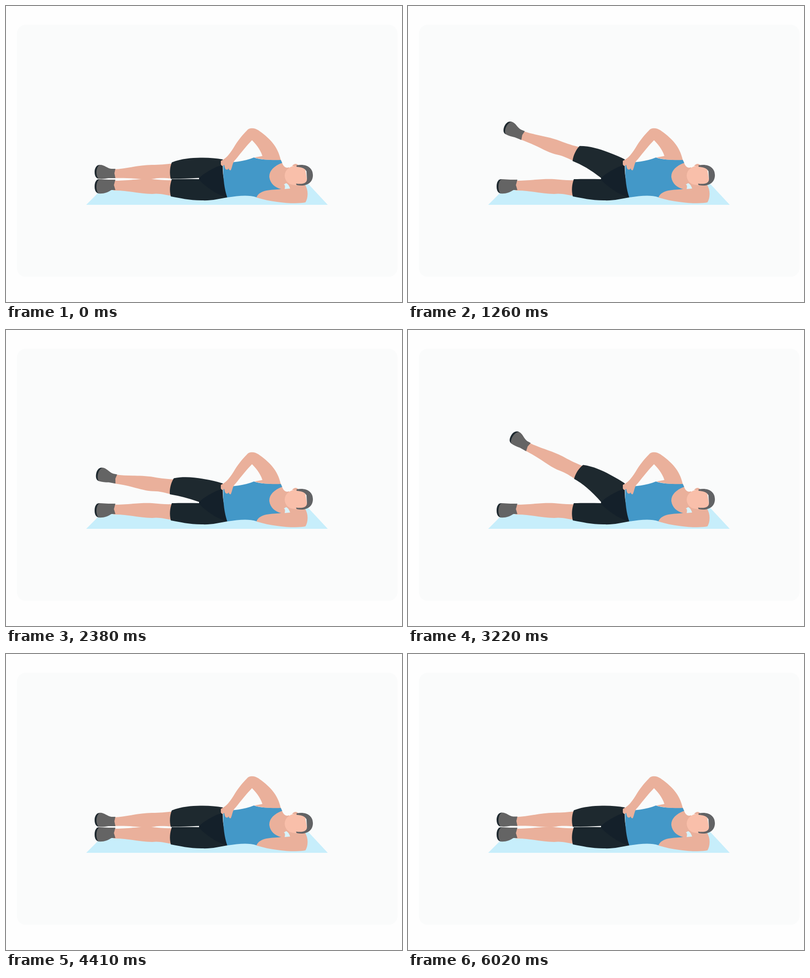
Animation of 800x600 px, one loop 6.09 s. Source, as an HTML page:

```html
<!DOCTYPE html>
<html lang="en">
<head>
<meta charset="utf-8">
<title>Side leg raise</title>
<style>
  html, body { margin: 0; width: 100%; height: 100%; overflow: hidden; background: #fefefe; }
  svg { display: block; width: 100vw; height: 100vh; }
  .skin { fill: #eab09b; }
  .shoe { fill: #646464; }
  .dark { fill: #1e292f; }
</style>
</head>
<body>
<svg viewBox="0 0 800 600">
  <rect width="800" height="600" fill="#fefefe"/>
  <rect x="22" y="38" width="769" height="511" rx="18" fill="#fafbfb"/>
  <path fill="#c7eefb" d="M162 403L204 361H611L650 403Z"/>

  <!-- resting leg -->
  <path class="skin" d="M217 354C245 354 268 350 295 351C310 352 322 354 337 353V385C322 383 310 379 295 381C268 381 245 373 217 374Z"/>
  <path class="dark" d="M189 351C181 351 179 359 179 366C179 374 182 380 189 380Z"/>
  <path class="shoe" d="M189 351C196 351 200 352 207 352L221 352L218 363L221 373L213 373C205 378 198 381 187 380C181 374 181 356 189 351Z"/>

  <!-- raised leg -->
  <g id="leg">
    <path class="skin" d="M217 331C245 330 268 322 295 322C310 322 322 321 338 319V350C322 349 312 348 300 350C280 354 255 347 217 349Z"/>
    <path class="dark" d="M190 322C182 322 179 330 179 336C179 343 181 349 187 350Z"/>
    <path class="shoe" d="M189 322C198 321 204 329 213 330L221 330L219 339L221 349L207 349C200 350 194 351 187 350C181 344 181 328 189 322Z"/>
  </g>

  <!-- shorts -->
  <path fill="#1a262d" d="M335 351C352 350.500 372 350.500 390 351L438 340L447 388C430 391 415 395 395 394C370 394 350 389 333 386C330 374 331 362 335 351Z"/>
  <path fill="#14202a" d="M390 344L438 312C437 340 440 365 447 388C425 382 405 368 390 352Z"/>
  <path id="thigh" class="dark"/>

  <!-- torso -->
  <path class="skin" d="M550 306L556 313C559 323 563 330 572 327L578 362C570 373 555 376 545 374C526 365 522 340 534 326Z"/>
  <path fill="#4398c8" d="M439 318C458 317 482 315 501 307C510 311 530 312 555 312L558 318C541 324 531 335 532 347C534 360 543 368 556 371C535 375 515 377 507 388C488 382 470 385 447 388C440 368 438 342 439 318Z"/>
  <path class="skin" d="M506 388C513 371 538 373 562 371L577 361H603C611 371 611 388 605 398C588 402 540 399 506 388Z"/>
  <path fill="#d8f3fb" d="M561 362Q565 362 563 371L574 370Q571 361 566 359Z"/>

  <!-- arm on hip -->
  <path class="skin" d="M434 314C446 308 451 301 460 287C468 273 479 260 487 252C492 246 502 247 510 252C530 266 549 283 555 312C540 313 515 312 502 307L518 304C514 291 505 280 497 272C488 281 476 296 464 311C457 317 458 325 454 333Q450 333 450 329Q447 334 443 330Q441 326 441 322Q436 327 434 321Z"/>

  <!-- head -->
  <path fill="#f9bfaa" d="M563 343C564 331 574 324 589 323L604 328L609 358C604 363 592 365 583 363C571 362 563 355 563 343Z"/>
  <path class="skin" d="M578 324Q584 317 590 322L588 325Z"/>
  <path fill="#626365" d="M587 323C607 319 620 328 620 343C620 359 606 367 587 363L586 360C600 362 608 359 608 351L607 335C602 327 596 327 587 326Z"/>
</svg>
<script>
const LOOP = 6090, STEP = 70, MOVE = 700, TOP = 29.7;
const HIP = [427.5, 331];
// start times, alternately raising and lowering
const starts = [35, 975, 2069, 3115, 4375, 5390];
const leg = document.getElementById('leg');
const thigh = document.getElementById('thigh');

function ease(s) {
  s = Math.min(1, Math.max(0, s));
  return s < 0.5 ? 4 * s ** 3 : 1 - 4 * (1 - s) ** 3;
}

function lift(t) {
  return starts.reduce((sum, start, i) =>
    sum + (i % 2 ? -1 : 1) * ease((t - start) / MOVE), 0);
}

function turner(deg) {
  const a = deg * Math.PI / 180, c = Math.cos(a), s = Math.sin(a);
  return (x, y) => {
    const dx = x - HIP[0], dy = y - HIP[1];
    return (HIP[0] + dx * c - dy * s).toFixed(2) + ' ' + (HIP[1] + dx * s + dy * c).toFixed(2);
  };
}

function draw(t) {
  const deg = TOP * lift(t), p = turner(deg);
  leg.setAttribute('transform', `rotate(${deg} ${HIP})`);
  // the cuff swings while the waist and crotch stay put
  thigh.setAttribute('d',
    `M${p(335, 317)}C${p(355, 309)} ${p(375, 308)} ${p(392, 307.5)}` +
    `Q${p(418, 307)} 438 311L438 321Q408 332 390 348.500` +
    `Q${p(362, 350)} ${p(333, 350.5)}C${p(330, 340)} ${p(331, 326)} ${p(335, 317)}Z`);
}

function tick(now) {
  draw(Math.floor((now % LOOP) / STEP) * STEP);
  requestAnimationFrame(tick);
}
draw(0);
requestAnimationFrame(tick);
</script>
</body>
</html>
```
